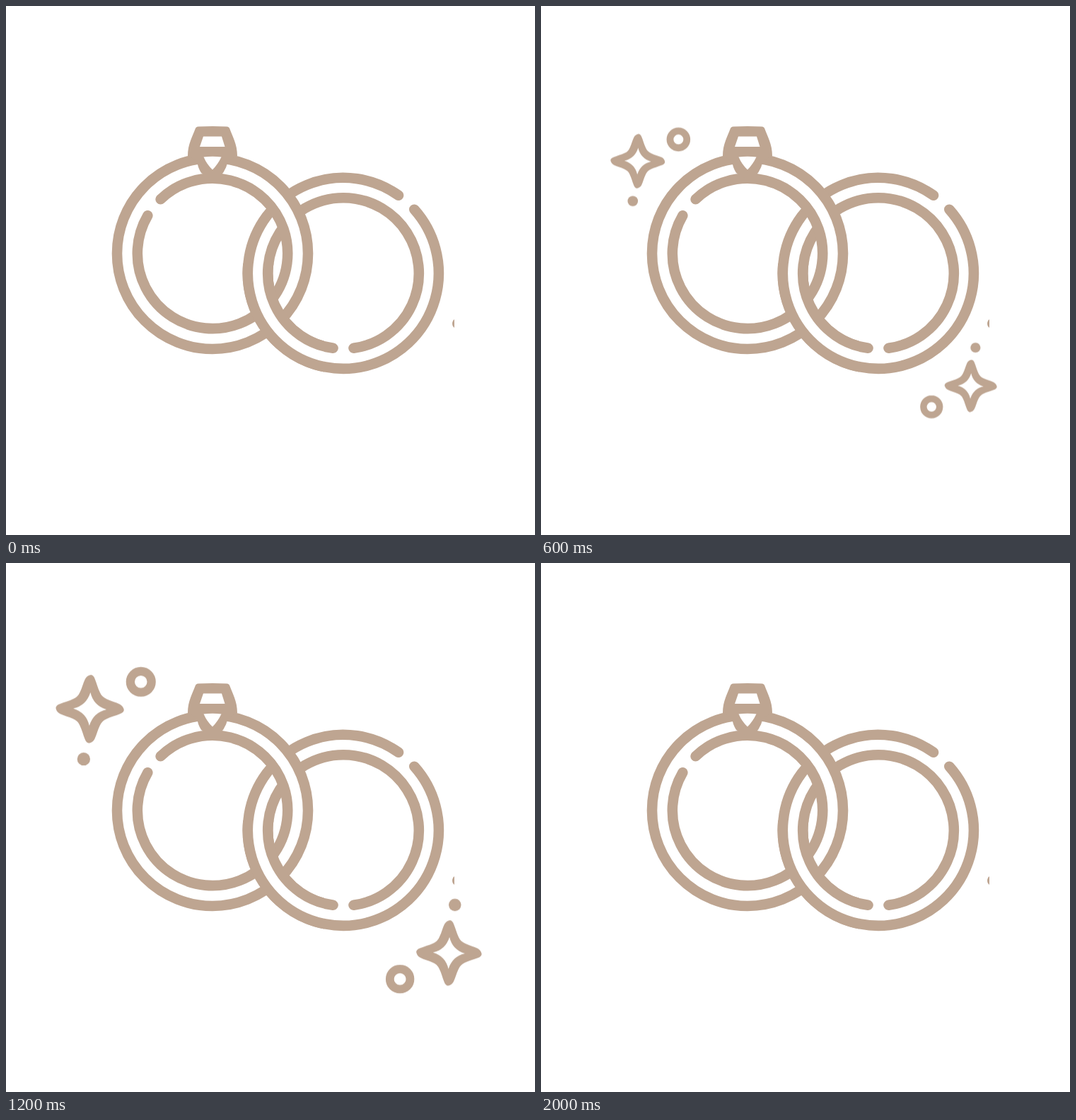
Write an HTML page that moves like this. It is 748 by 748 pixels and loops after 2.2 s.

```html
<!DOCTYPE html>
<html lang="en">
<head>
<meta charset="utf-8">
<title>Wedding rings</title>
<style>
  html, body { margin: 0; width: 100%; height: 100%; overflow: hidden; background: #fff; }
  svg { display: block; width: 100%; height: 100%; }
  .tan { fill: #bea591; }
  .white { fill: #fff; }
  .band { fill: none; stroke: #bea591; stroke-width: 14.6; stroke-linecap: round; }
  .gap { fill: none; stroke: #fff; stroke-width: 16; }

  /* Sparkles grow away from the rings and shrink back in 200 ms steps. */
  .sparkle { animation: 2200ms step-end infinite; }
  #upper { animation-name: upper; }
  #lower { animation-name: lower; }
  @keyframes upper {
    0%, 90.9091%, 100% { transform: scale(0); }
    9.0909%, 81.8182% { transform: translate(140px, 201px) scale(.41); }
    18.1818%, 72.7273% { transform: translate(122px, 183px) scale(.508); }
    27.2727%, 63.6364% { transform: translate(98px, 172px) scale(.636); }
    36.3636%, 54.5455% { transform: translate(70px, 147px) scale(.797); }
    45.4545% { transform: translate(38px, 115px); }
  }
  @keyframes lower {
    0%, 90.9091%, 100% { transform: scale(0); }
    9.0909%, 81.8182% { transform: translate(607px, 546px) scale(-.396); }
    18.1818%, 72.7273% { transform: translate(624px, 561px) scale(-.49); }
    27.2727%, 63.6364% { transform: translate(645px, 583px) scale(-.612); }
    36.3636%, 54.5455% { transform: translate(673px, 608.5px) scale(-.765); }
    45.4545% { transform: translate(707px, 627px) scale(-.957); }
  }
</style>
</head>
<body>
<svg viewBox="0 0 748 748">
  <defs>
    <clipPath id="crossing"><rect x="300" y="364" width="150" height="170"/></clipPath>

    <g id="plain-ring">
      <circle class="gap" cx="477" cy="378" r="121"/>
      <path class="band" d="M555 267.8A135 135 0 1 0 577.3 287.7"/>
      <path class="band" d="M491.5 483.8A106.8 106.8 0 1 0 462.5 483.8"/>
    </g>

    <g id="sparkle">
      <path class="tan" fill-rule="evenodd" transform="translate(61 74.5)" d="
        M1.5 -60.5
        C4.5 -60.5 7.5 -58 9 -53C12 -46 14 -37 18 -29Q21 -21.5 30 -17.5C38 -13.5 46 -12 53 -8.5Q59 -5.5 60.5 1.5
        C60.5 4.5 58 7.5 53 9C46 12 37 14 29 18Q21.5 21 17.5 30C13.5 38 12 46 8.5 53Q5.5 59 -1.5 60.5
        C-4.5 60.5 -7.5 58 -9 53C-12 46 -14 37 -18 29Q-21 21.5 -30 17.5C-38 13.5 -46 12 -53 8.5Q-59 5.5 -60.5 -1.5
        C-60.5 -4.5 -58 -7.5 -53 -9C-46 -12 -37 -14 -29 -18Q-21.5 -21 -17.5 -30C-13.5 -38 -12 -46 -8.5 -53Q-5.5 -59 1.5 -60.5Z
        M1 -29.5Q6 -6.5 29.5 1Q6.5 6 -1 29.5Q-6 6.5 -29.5 -1Q-6.5 -6 1 -29.5Z"/>
      <circle cx="151.5" cy="26.3" r="18.7" fill="none" stroke="#bea591" stroke-width="15.4"/>
      <circle class="tan" cx="50" cy="163.3" r="11.5"/>
    </g>
  </defs>

  <use href="#plain-ring"/>

  <g id="diamond-ring">
    <circle class="gap" cx="292" cy="350" r="121"/>
    <circle class="band" cx="292" cy="350" r="135"/>
    <path class="band" d="M200.3 296.4A106.2 106.2 0 1 0 218.6 273.2" stroke-width="15"/>
    <path class="tan" d="M272 170.5Q292 169.5 312 170.5Q315.5 170.5 316.5 174C320 184 327 195 327 212L314 219Q312 228 307 236L292 246L276 236Q271 228 270 219L257 212C257 195 264 184 267.5 174Q268.5 170.5 272 170.5Z"/>
    <path class="white" d="M279 184.5H305L309.5 199H274Z"/>
    <path class="white" d="M279.5 213.5Q292 212 304.5 213.5Q299.5 224 292 231.5Q284 224 279.5 213.5Z"/>
  </g>

  <!-- The plain ring passes in front at the lower crossing. -->
  <use href="#plain-ring" clip-path="url(#crossing)"/>

  <path class="tan" d="M634 443A7.5 7.5 0 0 0 634 455Z"/>

  <use id="upper" class="sparkle" href="#sparkle"/>
  <use id="lower" class="sparkle" href="#sparkle"/>
</svg>
</body>
</html>
```
